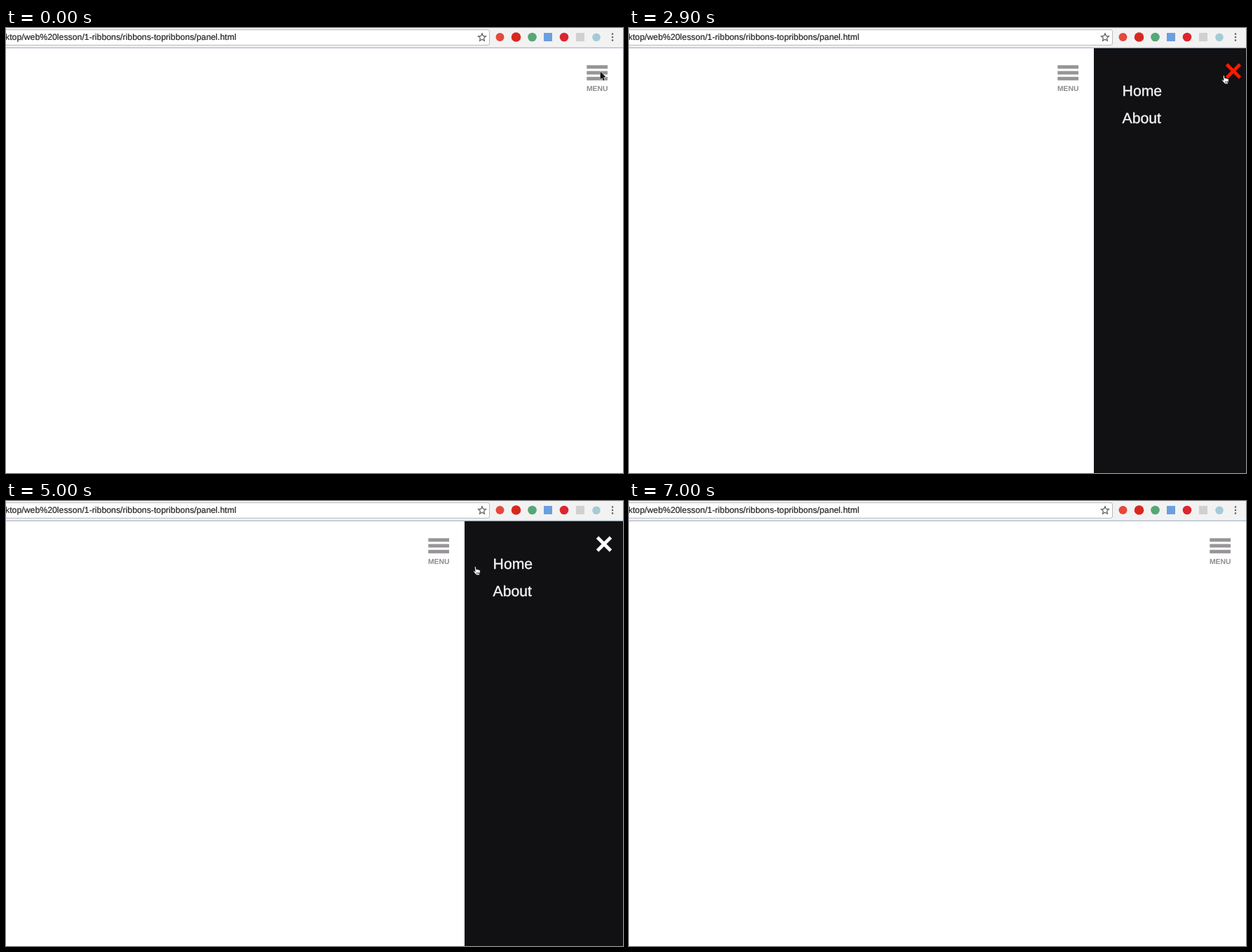
Write an HTML page that moves like this. It is 880 px wide and 636 px high and loops after 7.1 s.

```html
<!DOCTYPE html>
<html lang="en">
<head>
<meta charset="utf-8">
<title>Sliding sidebar</title>
<style>
  html, body { margin: 0; width: 100%; height: 100%; overflow: hidden; background: #fff; }
  svg { display: block; font-family: "Liberation Sans", Arial, sans-serif; text-rendering: geometricPrecision; }
  .link { font-size: 21.2px; fill: #f4f4f4; stroke: #f4f4f4; stroke-width: .4px; }
  .label { font-size: 10.4px; font-weight: bold; fill: #8e8e8e; text-anchor: middle; }
  .address { font-size: 12.3px; fill: #222; stroke: #222; stroke-width: .2px; }
</style>
</head>
<body>
<svg width="880" height="636" viewBox="0 0 880 636">
  <rect width="880" height="636" fill="#fff"/>

  <g id="page">
    <g fill="#979597">
      <rect x="828.3" y="53.2" width="29.7" height="5"/>
      <rect x="828.3" y="61.5" width="29.7" height="5"/>
      <rect x="828.3" y="69.8" width="29.7" height="5"/>
    </g>
    <text class="label" x="843.2" y="90.2">MENU</text>
    <rect x="880" y="28" width="230" height="608" fill="#111012"/>
    <text class="link" x="920.6" y="97">Home</text>
    <text class="link" x="920.6" y="135.5">About</text>
    <path id="close" d="M1069.5 52l19 19m0-19l-19 19" fill="none" stroke-width="4.8"/>
  </g>

  <g id="toolbar">
    <rect width="880" height="28" fill="#f3f2f3"/>
    <rect y="27.7" width="880" height="1.2" fill="#a9b6c9"/>
    <rect x="-10" y="2.5" width="699.5" height="22" rx="2.5" fill="#fff" stroke="#b9b9b9"/>
    <text class="address" x="-1" y="17.3">ktop/web%20lesson/1-ribbons/ribbons-topribbons/panel.html</text>
    <path d="M679 7.8l1.6 3.6 3.9.4-2.9 2.6.8 3.9-3.4-2-3.4 2 .8-3.9-2.9-2.6 3.9-.4z" fill="none" stroke="#5c5c5c" stroke-width="1.2"/>
    <circle cx="704.5" cy="13" r="6" fill="#e5483c"/>
    <circle cx="727.5" cy="13" r="6.8" fill="#d7281f"/>
    <circle cx="750.5" cy="13" r="6.3" fill="#55a875"/>
    <rect x="767" y="7" width="12" height="12" fill="#6b9fe0"/>
    <circle cx="796" cy="13" r="6.3" fill="#dc2530"/>
    <rect x="813" y="7" width="12" height="12" fill="#d0d0d0"/>
    <circle cx="842" cy="13.3" r="5.8" fill="#a3cbd6"/>
    <g fill="#666">
      <circle cx="865" cy="8.6" r="1.3"/>
      <circle cx="865" cy="13.1" r="1.3"/>
      <circle cx="865" cy="17.6" r="1.3"/>
    </g>
  </g>

  <path id="arrow" d="M.6 .2V11.6L3.2 9.2 5 13.2 6.8 12.4 5.1 8.6 8.6 8.3Z" fill="#111" stroke="#fff" stroke-width="1" paint-order="stroke"/>
  <g id="hand" stroke="#111" stroke-width="1" stroke-linejoin="round">
    <path fill="#fff" d="M2.2 1.6C2.2.3 4 .3 4.3 1.6L5 5C5.4 4.2 6.6 4.3 6.9 5.2 7.4 4.6 8.5 4.8 8.7 5.7 9.4 5.2 10.4 5.8 10.4 6.8 10.4 9.5 9.6 10.5 9.5 13H4.6C4.2 11.5 1.8 9.6.7 8 .3 7 1.6 6.4 2.4 7.2L3.1 7.9Z"/>
    <path fill="none" stroke-width=".7" d="M5.6 9v2.4M7.1 9v2.4M8.5 9v2.4"/>
  </g>
</svg>
<script>
const LOOP = 7100, STEP = 100, SHIFT = 226, SLIDE = 500;

// start time, opening or closing
const slides = [[1105, 1], [2871, 0], [3804, 1], [5483, 0]];

// time, x, y
const path = [
  [0, 847, 62], [600, 847, 62], [700, 844, 64], [1000, 845, 67],
  [1300, 845, 67], [1600, 831, 71], [1900, 722, 98], [2000, 714, 104],
  [2400, 845, 67], [3800, 845, 67], [4200, 838, 70], [4600, 722, 90],
  [4700, 708, 100], [4900, 690, 104], [5200, 619, 71], [LOOP, 619, 71]
];
const HAND_FROM = 700, GONE_FROM = 6600;
const RED_FROM = 2400, RED_TO = 3400;

const el = id => document.getElementById(id);
const [page, cross, arrow, hand] = ["page", "close", "arrow", "hand"].map(el);

// cubic-bezier(.25, .1, .25, 1)
function ease(x) {
  if (x <= 0) return 0;
  if (x >= 1) return 1;
  const curve = (s, a, b) => 3 * (1 - s) * (1 - s) * s * a + 3 * (1 - s) * s * s * b + s ** 3;
  let lo = 0, hi = 1;
  for (let i = 0; i < 24; i++) {
    const mid = (lo + hi) / 2;
    if (curve(mid, .25, .25) < x) lo = mid; else hi = mid;
  }
  return curve(lo, .1, 1);
}

function openness(t) {
  let value = 0;
  for (const [start, open] of slides) {
    if (t < start) break;
    const p = ease((t - start) / SLIDE);
    value = open ? p : 1 - p;
  }
  return value;
}

function cursorAt(t) {
  const i = path.findIndex(p => p[0] > t);
  const [t0, x0, y0] = path[i - 1], [t1, x1, y1] = path[i];
  const k = (t - t0) / (t1 - t0);
  return [Math.round(x0 + (x1 - x0) * k), Math.round(y0 + (y1 - y0) * k)];
}

const show = (node, on) => node.setAttribute("visibility", on ? "visible" : "hidden");

function draw(now) {
  const t = Math.floor((now % LOOP) / STEP) * STEP;
  page.setAttribute("transform", `translate(${-Math.round(SHIFT * openness(t))} 0)`);
  cross.setAttribute("stroke", t >= RED_FROM && t < RED_TO ? "#fa1a00" : "#fff");
  const place = `translate(${cursorAt(t).join(" ")})`;
  arrow.setAttribute("transform", place);
  hand.setAttribute("transform", place);
  show(arrow, t < HAND_FROM);
  show(hand, t >= HAND_FROM && t < GONE_FROM);
}

const begin = performance.now();
function tick() {
  draw(performance.now() - begin);
  requestAnimationFrame(tick);
}
tick();
</script>
</body>
</html>
```
